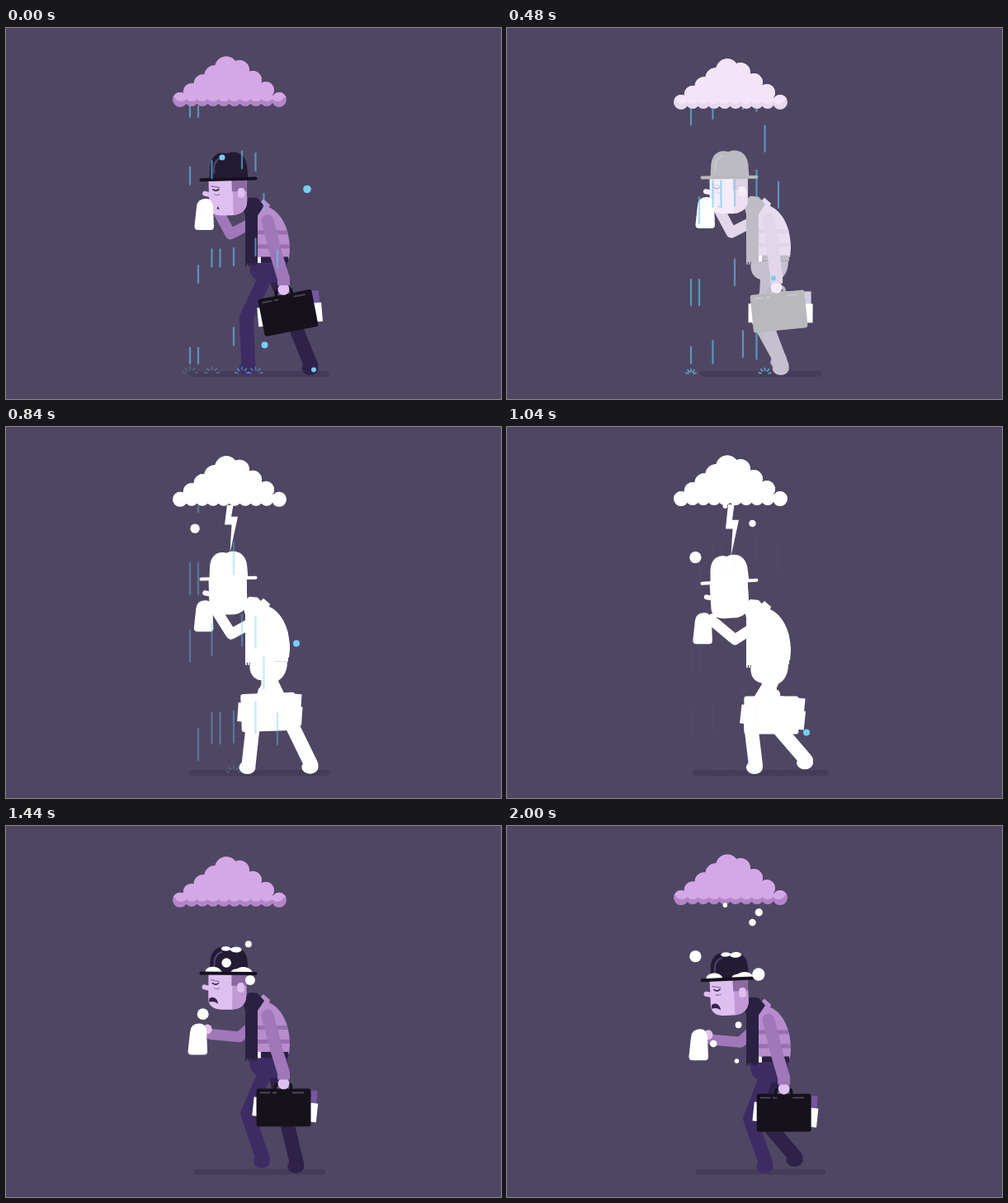
An HTML page with a canvas that plays this animation: 600 px wide and 450 px high, repeating every 2.04 s.

```html
<!DOCTYPE html>
<html lang="en">
<head>
<meta charset="utf-8">
<title>Bad weather walk</title>
<style>
html, body { margin: 0; width: 100%; height: 100%; overflow: hidden; background: #4f4664; }
canvas { display: block; width: 600px; height: 450px; }
</style>
</head>
<body>
<canvas id="stage" width="600" height="450"></canvas>
<script>
const LOOP = 2040, FRAME = 40, STRIDE = 830, GROUND = 412;
const stage = document.getElementById('stage').getContext('2d');
const layer = document.createElement('canvas');
layer.width = 600;
layer.height = 450;
const fig = layer.getContext('2d');

const C = {
  bg: '#4f4664', shadow: '#453c58', cloud: '#d4a8e6', cloudShade: '#b484c9',
  hat: '#231b33', brim: '#15101e', shine: '#50456f',
  skin: '#dfbfef', skinShade: '#c199d5', hair: '#8b69a2', ink: '#33234b',
  shirt: '#b88dcd', stripe: '#996fb1', sleeve: '#a077b9', scarf: '#2a2041',
  near: '#3d2c64', far: '#2f2249', bag: '#15121b', folder: '#7457a0',
  rain: '#66c8ee', drop: '#78cdf2'
};

const { PI, sin, cos, sqrt, floor, min, max, abs, hypot } = Math;
const ramp = (t, a, b) => max(0, min(1, (t - a) / (b - a)));
const ease = u => u * u * (3 - 2 * u);

function oval(g, x, y, rx, ry, color) {
  g.fillStyle = color;
  g.beginPath();
  g.ellipse(x, y, rx, ry, 0, 0, 7);
  g.fill();
}
function box(g, x, y, w, h, r, color) {
  g.fillStyle = color;
  g.beginPath();
  g.roundRect(x, y, w, h, r);
  g.fill();
}
function shape(d, color) {
  fig.fillStyle = color;
  fig.fill(new Path2D(d));
}
function line(d, color, width, cap = 'round') {
  fig.strokeStyle = color;
  fig.lineWidth = width;
  fig.lineCap = cap;
  fig.lineJoin = 'round';
  fig.stroke(new Path2D(d));
}
function at(x, y, deg, draw) {
  fig.save();
  fig.translate(x, y);
  fig.rotate(deg * PI / 180);
  draw();
  fig.restore();
}

// The walk: feet slide on a cosine, lingering a little after each contact.
function poseAt(t) {
  const raw = t / STRIDE, n = floor(raw), s = raw - n;
  const swing = cos(PI * (n + s - .07 * sin(PI * s)));
  const bob = sin(2 * PI * s), lower = ease(ramp(t, 700, 1500));
  const lift = 8 * sin(PI * s), nearStands = n % 2 === 0;
  return {
    body: 1.5 + 3.5 * bob,
    head: [269.5, 183.3 + 4.5 * bob, -1.5 - 2 * bob],
    cloth: [240 - 8 * lower, 207 + 37 * lower + 4 * bob],
    elbow: [272 + 11 * lower, 250 + 10 * lower + 4 * bob],
    shoulder: 235 + 10 * lower,
    bag: [330 + 12 * swing, 345.5 + 4 * bob, -11 * (1 - ramp(t, 0, 1040))],
    nearFoot: [332 - 38 * swing, GROUND - (nearStands ? 0 : lift)],
    farFoot: [332 + 38 * swing, GROUND - (nearStands ? lift : 0)],
    shadow: 73 + 12 * abs(swing),
    cloud: 1.5 - 1.5 * cos(4 * PI * t / LOOP)
  };
}

function drawCloud(dy) {
  at(0, dy, 0, () => {
    const path = new Path2D('M211 88L267 46L283 50L331 88Z');
    const puff = (x, y, r) => { path.moveTo(x + r, y); path.arc(x, y, r, 0, 7); };
    for (let i = 0; i < 5; i++) puff(211 + 14 * i, 87 - 9.7 * i, 9 + 1.2 * i);
    for (let i = 0; i < 4; i++) puff(331 - 16 * i, 87 - 12 * i, 9 + i);
    for (let x = 225; x < 322; x += 13) puff(x, 87, 8);
    fig.fillStyle = C.cloudShade;
    fig.fill(path);
    fig.save();
    fig.clip(path);
    box(fig, 190, 20, 160, 64, 0, C.cloud);
    for (let x = 212; x < 335; x += 13) oval(fig, x, 82, 8, 7, C.cloud);
    fig.restore();
  });
}

// Two equal bones; the knee bends towards the walking direction.
function drawLeg(hx, hy, [fx, fy], color) {
  const bone = 58.5, dx = fx - hx, dy = fy - 2 - hy, d = hypot(dx, dy);
  const bend = sqrt(max(0, bone * bone - d * d / 4)) / d;
  const kx = hx + dx / 2 - dy * bend, ky = hy + dy / 2 + dx * bend;
  line(`M${hx} ${hy}L${kx} ${ky}L${fx} ${fy - 2}`, color, 17);
  oval(fig, fx - 1.5, fy + 1, 10, 8, color);
}

function drawTorso(dy) {
  at(0, dy, 0, () => {
    const torso = 'M301 212L313 214C333 219 344 241 344 268L343 278L302 278Z';
    shape('M304 214L312 206L320 213L317 222Z', C.shirt);
    shape(torso, C.shirt);
    fig.save();
    fig.clip(new Path2D(torso));
    box(fig, 300, 244, 50, 5, 0, C.stripe);
    box(fig, 300, 261, 50, 5, 0, C.stripe);
    fig.restore();
    shape('M296 283H341C341 298 333 306 325 308L306 305C297 302 294 293 296 283Z', C.near);
    box(fig, 302, 276, 40, 7, 0, C.scarf);
    box(fig, 302, 276, 7, 7.5, 0, '#f4eafa');
  });
}

function drawScarf(dy) {
  at(0, dy, 0, () => {
    shape('M286 212L295 204L305 205L313 214L305 226V284H290V226Z', C.scarf);
    for (let x = 291; x < 306; x += 3) line(`M${x} 283V287`, C.scarf, 1.7, 'butt');
  });
}

function drawHead([x, y, deg], snow) {
  at(x, y, deg, () => {
    const face = 'M-24 0H22V27C22 39 13 44 2 44H-8C-18 44 -24 39 -24 31Z';
    at(-22, 18.5, 14, () => box(fig, -10, -3, 14, 6, 3, C.skin));
    shape(face, C.skin);
    fig.save();
    fig.clip(new Path2D(face));
    box(fig, 5, 0, 20, 46, 0, C.skinShade);
    box(fig, 4, 0, 19, 15, 0, C.hair);
    fig.restore();
    box(fig, 11, 11, 8.5, 12, 4, C.skin);
    line('M-21 8L-11 10', C.hair, 1.2);
    line('M-19 12Q-15 15 -12 12', C.ink, 1.6);
    line('M-17 18Q-14 20 -11 18', C.hair, 1);
    shape('M-23 31C-20 27 -13 29 -12 37C-16 34 -20 34 -23 35Z', C.ink);
    shape('M-23 0L-22 -16C-20 -30 -11 -34 -1 -31C8 -35 21 -32 23 -16L24 0Z', C.hat);
    line('M-17 -8V-14Q-16 -24 -8 -26', C.shine, 2);
    line('M-33 0H33', C.brim, 4);
    if (!snow) return;
    oval(fig, -3, -30, 6 * snow, 2.7 * snow, '#fff');
    oval(fig, 9, -29, 7 * snow, 3.5 * snow, '#fff');
    fig.translate(0, -2);
    fig.scale(1, snow);
    shape('M-28 0C-27 -8 -11 -8 -8 0ZM3 0C5 -4 9 -3 11 -4C18 -8 27 -5 29 0Z', '#fff');
  });
}

function drawCloth([x, y]) {
  at(x, y, 0, () => {
    oval(fig, 12, 7, 5.5, 6, C.skin);
    shape('M-9 10Q-8 0 2 0Q10 0 11 9L12 34Q12 38 8 38H-7Q-12 38 -11.5 33Z', '#fff');
  });
}

function drawBag([x, y, deg], dy) {
  at(x, y, deg, () => {
    at(2, 0, 6, () => {
      box(fig, -15, -24, 52, 34, 0, C.folder);
      box(fig, -39, -9, 78, 23, 0, '#fff');
    });
    line('M-10 -21V-25Q-10 -29 -6 -29H5Q9 -29 9 -25V-21', C.bag, 3.5);
    box(fig, -33, -23, 66, 46, 3, C.bag);
    line('M-28 -18H-17M-13 -18H-9M11 -18H24', '#4b465d', 1.8);
  });
  const r = deg * PI / 180, hx = x + 29 * sin(r), hy = y - 29 * cos(r);
  oval(fig, hx, hy, 7, 7, C.skin);
  const sx = 317, sy = 232 + dy;
  line(`M${sx} ${sy}L${(sx + hx) / 2 + 1} ${(sy + hy) / 2}L${hx} ${hy - 13}`, C.sleeve, 15);
  box(fig, hx - 7.5, hy - 14, 15, 9, 0, C.sleeve);
}

function drawFigure(p, t) {
  fig.clearRect(0, 0, 600, 450);
  drawCloud(p.cloud);
  drawLeg(325, 297 + p.body, p.farFoot, C.far);
  drawLeg(316, 297 + p.body, p.nearFoot, C.near);
  drawTorso(p.body);
  const [cx, cy] = p.cloth;
  line(`M298 ${p.shoulder + p.body}L${p.elbow}L${cx + 16} ${cy + 13}`, C.sleeve, 13);
  drawScarf(p.body);
  drawHead(p.head, ramp(t, 1060, 1400));
  drawCloth(p.cloth);
  drawBag(p.bag, p.body);
}

function whiten(amount) {
  fig.globalCompositeOperation = 'source-atop';
  fig.globalAlpha = amount;
  box(fig, 0, 0, 600, 450, 0, '#fff');
  fig.globalAlpha = 1;
  fig.globalCompositeOperation = 'source-over';
}

function drawBolt(t, top, tip, alpha) {
  const kink = .18 + .12 * ramp(t, 640, 1040);
  const y = k => top + (tip - top) * k;
  stage.globalAlpha = alpha;
  stage.fillStyle = '#fff';
  stage.fill(new Path2D(`M268 ${top}H275.5L273 ${y(kink)}H281L271.5 ${y(1)}L273.5 ${y(kink + .17)}H265Z`));
  stage.globalAlpha = 1;
}

// Rain falls in paired columns; each row lists when its streaks leave the cloud.
const RAIN_CYCLE = 640, RAIN_SPEED = .47;
const departures = [[434, 608], [180, 608], [222, 450], [222], [20, 225], [475], [250, 470], [365], [220]];

function drawSplash(x, age) {
  const r = 3 + age / 50;
  stage.lineWidth = 1.8;
  stage.lineCap = 'round';
  stage.beginPath();
  for (let i = 0; i < 5; i++) {
    const a = PI * (1.08 + .21 * i), c = cos(a), s = sin(a);
    stage.moveTo(x + r * c, 420 + r * s);
    stage.lineTo(x + (r + 3) * c, 420 + (r + 3) * s);
  }
  stage.stroke();
}

function drawRain(t, cloudY) {
  const fade = ramp(t, 1060, 720), top = 94 + cloudY;
  if (!fade) return;
  const length = 23 + 17 * ramp(t, 280, 600);
  const fall = (GROUND - top) / RAIN_SPEED;
  stage.strokeStyle = C.rain;
  departures.forEach((times, i) => {
    const x = 223 + 26.5 * floor(i / 2) + 10 * (i % 2);
    for (const start of times) {
      const first = (t - start + 2 * RAIN_CYCLE) % RAIN_CYCLE;
      for (const age of [first, first + RAIN_CYCLE]) {
        const y = top + age * RAIN_SPEED, tail = max(top, y - length), tipY = min(y, GROUND - 4);
        stage.globalAlpha = .6 * fade;
        if (tipY > tail) box(stage, x - 1.1, tail, 2.2, tipY - tail, 1, C.rain);
        const landed = age - fall;
        if (landed < 0 || landed > 200) continue;
        stage.globalAlpha = .7 * fade * min(1, 2 - landed / 100);
        drawSplash(x, landed);
      }
    }
  });
  stage.globalAlpha = 1;
}

// Hail: time, place and size at that time, and where it breaks.
const hail = [
  [0, 365, 195.5, 4.8, 417], [1040, 363, 370.5, 4, 417], [280, 312, 195.5, 3, 417],
  [280, 286.5, 144, 4, 175], [0, 262, 157, 3.5, 175], [0, 313.5, 384.5, 4, 417], [0, 373, 414.5, 3, 417]
];
function drawHail(t) {
  for (const [t0, x, y0, r, end] of hail) {
    const y = y0 + .54 * (t - t0);
    if (y > 135 && y < end) oval(stage, x + .055 * (t - t0), y, r, r, C.drop);
  }
}

// Snow: birth, x, size. Flakes sway, swell and melt as they fall.
const flakes = [
  [1020, 264, 6], [900, 295, 6], [665, 232, 7.5], [1150, 290, 4.5], [1500, 303, 7.7],
  [1625, 232, 7.5], [1930, 304, 8], [1860, 295, 6], [1980, 264, 6]
];
function drawSnow(t) {
  for (const [birth, x, size] of flakes) {
    const age = t - birth, life = (age + 70) / 1260;
    if (age < 0 || life > 1) continue;
    const sway = 7 * sin(age / 250) - .009 * age;
    const r = size * sqrt(sin(PI * life));
    oval(stage, x + (x < 250 ? -sway : sway), 92.5 + .175 * age, r, r, '#fff');
  }
}

function render(t) {
  const p = poseAt(t);
  const flash = min(ramp(t, 200, 600), ramp(t, 1400, 1080));
  drawFigure(p, t);
  if (flash) whiten(flash);
  stage.fillStyle = C.bg;
  stage.fillRect(0, 0, 600, 450);
  box(stage, 307.5 - p.shadow, 416, 2 * p.shadow, 7, 3.5, C.shadow);
  if (t >= 560 && t <= 1120) drawBolt(t, 94 + p.cloud, p.head[1] - 31, flash);
  stage.drawImage(layer, 0, 0);
  drawRain(t, p.cloud);
  drawHail(t);
  drawSnow(t);
}

const begin = performance.now();
function tick() {
  const t = (performance.now() - begin) % LOOP;
  render(floor(t / FRAME) * FRAME);
  requestAnimationFrame(tick);
}
tick();
</script>
</body>
</html>
```
